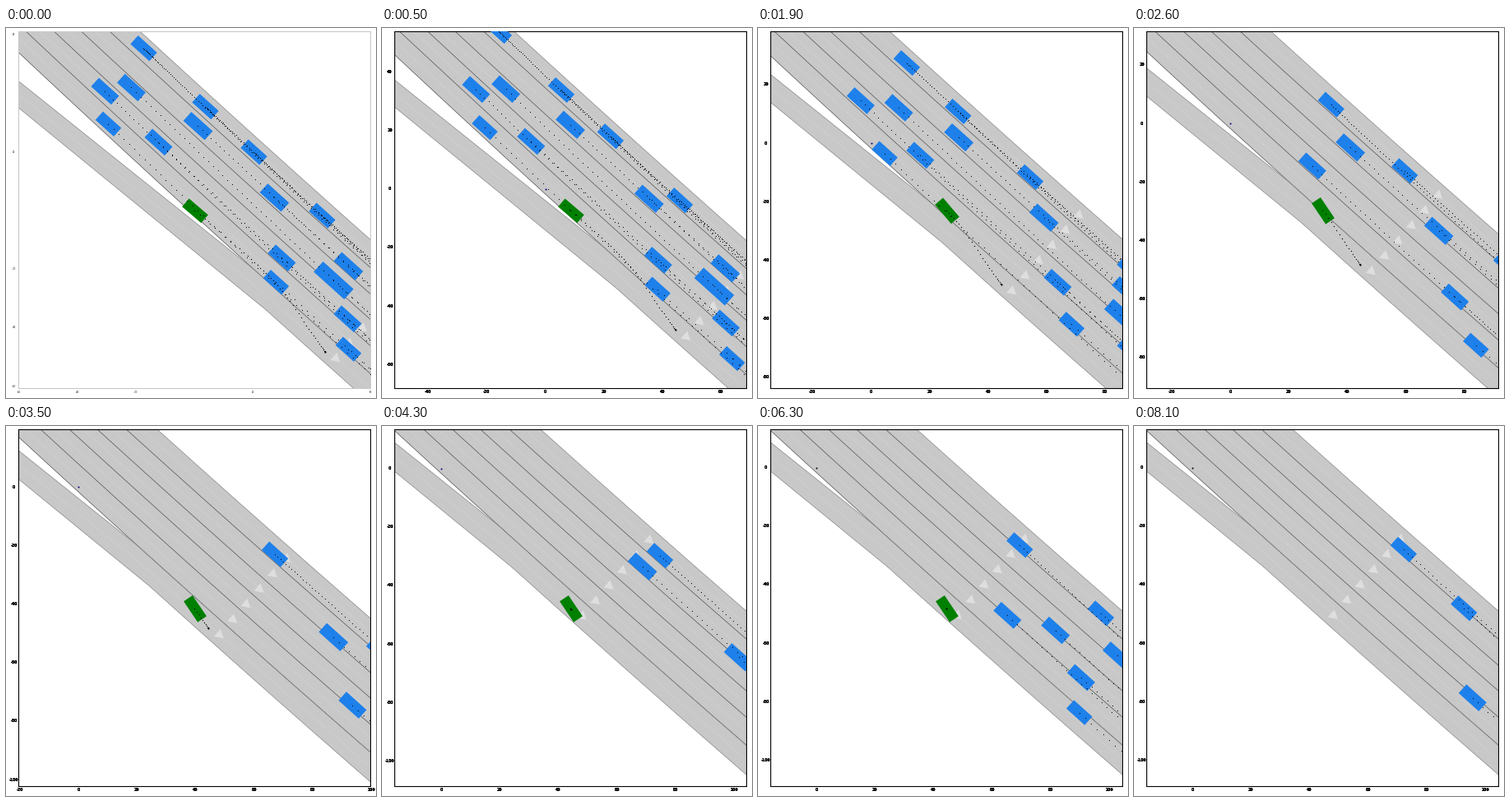
Recreate the animation shown at these times as a matplotlib script. Size 450 by 450 pixels, loop 8600 ms.

```python
import numpy as np
import matplotlib.pyplot as plt
from matplotlib.animation import FuncAnimation
from matplotlib.patches import Polygon

SIZE, DPI = 450, 100
LEFT, RIGHT, TOP, BOTTOM = 15, 443, 4, 438
PX = 72 / DPI
CENTER = np.array([230, 222.3])
TICK = 71.2                      # pixels per 20 units
LAST = 81

ROAD, LANE, EDGE, MIDDLE = "#c8c8c8", "#5a5a5a", "#8c8c8c", "#d1d1d1"
BLUE, GREEN, ARROW = "#1e80ea", "#008000", "#dedede"

LANES = [0, 34, 66, 97, 129, 163, 199]      # border offsets, upper to lower

# Per stream: offset, speed, gain with start, acceleration, length, starts
STREAMS = [
    (21, 1.15, .003, .045, 31, [-62, 13, 72, 155, 270]),
    (53, 5.25, .006, .015, 35, [4, 97, 187]),
    (83, 6.3, .006, 0, 34, [-77]),
    (87, 6.3, .006, 0, 50, [169]),
    (118, 5.6, .006, .015, 33, [-109, -44, 106, 186]),
    (154, 6.9, .006, .015, 30, [-105, 99, 187]),
]

# Key poses of the green car: time, x, y
EGO = np.array([(0, 0, 0), (10, 59.5, 51), (26, 112.5, 106),
                (35, 141.5, 148), (43, 157.5, 170.5), (46, 158.5, 171.5)])


def border(x):
    return -156.9 + .913 * x - 6e-5 * x * x


def ramp_top(x):
    return np.maximum(14 + .8 * x, border(x) + LANES[-2])


def ramp_low(x):
    return np.maximum(50 + .817 * x, border(x) + LANES[-1])


def ego_path(t):
    """Cubic Hermite curve through the key poses."""
    times, points = EGO[:, 0], EGO[:, 1:]
    slopes = np.gradient(points, times, axis=0)
    t = np.clip(np.atleast_1d(t), times[0], times[-1])
    k = np.clip(np.searchsorted(times, t, side="right") - 1, 0, len(times) - 2)
    h = (times[k + 1] - times[k])[:, None]
    u = (t - times[k])[:, None] / h
    return ((1 + 2 * u) * (1 - u) ** 2 * points[k] + u * (1 - u) ** 2 * h * slopes[k]
            + u * u * (3 - 2 * u) * points[k + 1] + u * u * (u - 1) * h * slopes[k + 1])


def car_path(stream, start, fan, t):
    offset, speed, gain, accel = stream[:4]
    x = start + (speed + gain * start) * t + accel * t * t / 2
    side = offset + .03 * (x - 90) + fan * (x - start)
    return np.stack([x, border(x) + side], -1)


def box(center, length, width, degrees):
    a = np.radians(degrees)
    along = np.array([np.cos(a), np.sin(a)]) * length / 2
    across = np.array([-np.sin(a), np.cos(a)]) * width / 2
    return center + np.array([along + across, along - across, -along - across, across - along])


def fill(points, color, z):
    ax.add_patch(Polygon(points, closed=True, fc=color, ec="none", zorder=z))


def dots(points, size, color="black", z=6):
    ax.plot(*points.T, ls="none", marker="o", ms=size * PX, mew=0, color=color, zorder=z)


def draw_road(origin):
    x = np.arange(-300, 521, 5)
    edge, top, low = border(x), ramp_top(x), ramp_low(x)

    def curve(y):
        return np.stack([x, y], -1) + origin

    def band(upper, lower):
        fill(np.vstack([curve(upper), curve(lower)[::-1]]), ROAD, 1)

    def stroke(y, color):
        ax.plot(*curve(y).T, color=color, lw=.75 * PX, zorder=2)

    band(edge, edge + LANES[-2])
    band(top, low)
    for upper, lower in zip(LANES[:-2], LANES[1:-1]):
        stroke(edge + (upper + lower) / 2, MIDDLE)
        stroke(edge + lower, LANE)
    stroke((top + low) / 2, MIDDLE)
    for y in (edge, top, low):
        stroke(y, EDGE)

    angles = np.radians([41, 161, 281])
    triangle = 7 * np.stack([np.cos(angles), np.sin(angles)], -1)
    for k in range(6):
        fill(triangle + origin + (253 - 16.3 * k, 87.2 + 18.5 * k), ARROW, 3)


def draw_axes(origin, faint):
    style = dict(ha="center", va="center", family="DejaVu Sans", clip_on=False,
                 weight="normal" if faint else "bold",
                 size=(2.6 if faint else 4.6) * PX)
    layers = 1 if faint else 3       # stacked text gives a heavier print
    for k in range(-8, 9):
        if faint and k in (0, 2):
            continue
        x, y = origin[0] + k * TICK, origin[1] - k * TICK
        for _ in range(layers):
            if LEFT - 2 <= x <= RIGHT + 1:
                ax.text(x, 442.5, f"{20 * k}", **style)
            if TOP <= y <= BOTTOM:
                ax.text(9.5, y, f"{20 * k}", **style)
    for spine in ax.spines.values():
        spine.set(color="#c8c8c8" if faint else "black", linewidth=1.1 * PX)


def draw_traffic(t, origin):
    rng = np.random.default_rng(4)
    ahead = np.arange(t, t + 150)
    rear = 15 * min(t, 35) - 300     # cars behind this point are gone
    for stream in STREAMS:
        length = stream[4]
        for start in stream[5]:
            path = car_path(stream, start, rng.uniform(-.02, .02), ahead)
            track = path + origin
            if path[0, 0] < rear or track[0, 0] > RIGHT + 30:
                continue
            fill(box(track[0], length, 9 + .16 * length, 42), BLUE, 4)
            dots(track[track[:, 0] < RIGHT + 5], 1.15)


def draw(i):
    t = min(i, LAST)
    ax.cla()
    ax.set(xlim=(LEFT, RIGHT), ylim=(BOTTOM, TOP), xticks=[], yticks=[])
    origin = CENTER - (.5, .3) - ego_path(t)[0]
    draw_road(origin)
    draw_axes(origin, t == 0)
    dots(origin[None] + .3, 2, "navy" if t < 46 else "black", 3)
    draw_traffic(t, origin)

    if t < LAST:
        fill(box(CENTER, 30.5, 13, np.interp(t, [12, 24], [40.5, 56])), GREEN, 5)
        track = ego_path(np.arange(t, max(t + 1, 48))) + origin
        dots(track, 1.3)
        dots(track[-1:], 2)
    return []


fig = plt.figure(figsize=(SIZE / DPI, SIZE / DPI), dpi=DPI, facecolor="white")
ax = fig.add_axes([LEFT / SIZE, 1 - BOTTOM / SIZE,
                   (RIGHT - LEFT) / SIZE, (BOTTOM - TOP) / SIZE])
animation = FuncAnimation(fig, draw, frames=86, interval=100, init_func=lambda: [],
                          repeat=True, repeat_delay=0, blit=False)
plt.show()
```
